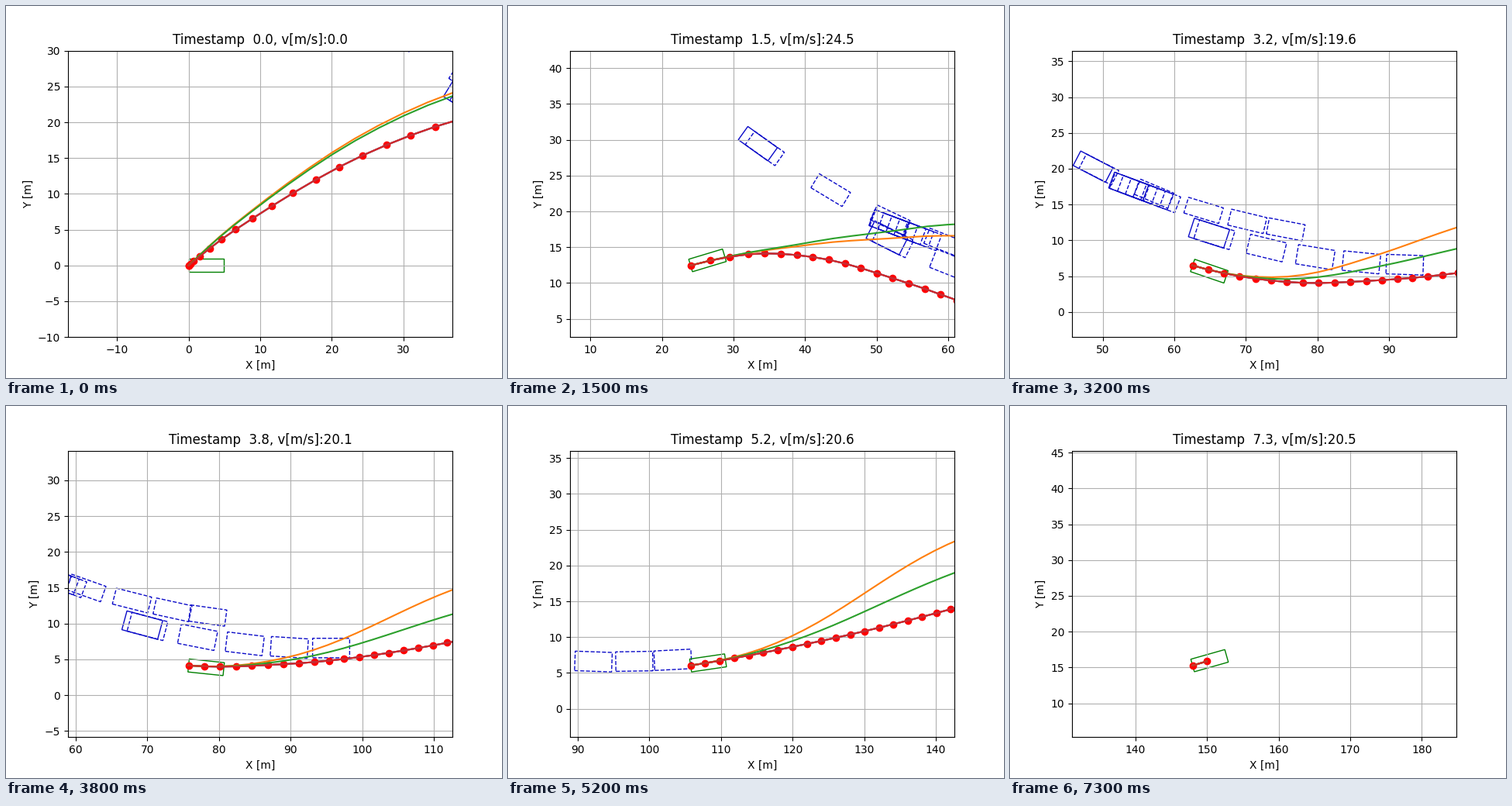
A matplotlib script that plays this animation: 640x480 px, repeating every 7400 ms.

```python
import numpy as np
import matplotlib.pyplot as plt
from matplotlib.animation import FuncAnimation
from matplotlib.patches import Rectangle

FRAMES = 74
DT = 0.1
HORIZON = 21
CAR_BLUE = "#0a0ac8"
LOOKAHEAD = (0.0, 0.1, 1.1, 2.1, 3.1, 4.1)


class Track:
    """Smooth route through a few (time, x, y) key points."""

    def __init__(self, *keys):
        keys = np.array(keys, float)
        self.t, self.p = keys[:, 0], keys[:, 1:]
        self.m = np.gradient(self.p, self.t, axis=0, edge_order=2)

    def __call__(self, t):
        t = np.atleast_1d(np.asarray(t, float))
        s = np.clip(t, self.t[0], self.t[-1])
        i = np.clip(np.searchsorted(self.t, s, side="right") - 1, 0, len(self.t) - 2)
        h = (self.t[i + 1] - self.t[i])[:, None]
        u = (s - self.t[i])[:, None] / h
        out = ((1 + 2 * u) * (1 - u) ** 2 * self.p[i]
               + u * (1 - u) ** 2 * h * self.m[i]
               + u * u * (3 - 2 * u) * self.p[i + 1]
               + u * u * (u - 1) * h * self.m[i + 1])
        # straight continuation past either end
        slope = np.where((t < self.t[0])[:, None], self.m[0], self.m[-1])
        return out + (t - s)[:, None] * slope

    def heading(self, t, lag):
        dx, dy = self(t)[0] - self(t - lag)[0]
        return np.degrees(np.arctan2(dy, dx))


ego = Track((0, 0, 0), (0.15, 0.1, 0.08), (0.3, 0.55, 0.45), (0.7, 5.09, 3.81),
            (1.3, 18.7, 10.8), (1.8, 32, 14), (2.2, 40.93, 13.55),
            (2.8, 53.9, 9.65), (3.2, 62.56, 6.49), (3.8, 75.75, 4.15),
            (4.4, 88.98, 4.3), (6.0, 121.99, 8.99), (7.4, 149.95, 15.85))

# other cars: route and (length, width)
CARS = (
    (Track((0, 17.8, 41.3), (2.2, 40, 25.1), (4.3, 57.2, 16.5),
           (6.3, 70.2, 12.65), (8.5, 81, 10.9)), (5.08, 2.28)),
    (Track((2.2, 52.5, 17.95), (4.7, 55.3, 16.9), (7.3, 58.1, 15.85)), (5.08, 2.36)),
    (Track((0, 38.5, 23.4), (2.2, 57.12, 13.74), (4.3, 72.86, 8.92),
           (6.4, 86.75, 6.87), (8.5, 99, 6.65), (10.1, 107.35, 7.17)), (5.17, 2.72)),
)


def speed(t):
    return np.interp(t, (0, 0.7, 1.3, 2.2, 3.2, 4.4, 6),
                     (0, 19.9, 26.5, 17.6, 19.6, 20.6, 20.5))


def ease(tau):
    u = np.clip(tau / 2.4, 0, 1)
    return u ** 3 * (10 - 15 * u + 6 * u * u)


def best_path(t, tau):
    """Coming route plus the planner's drift, which fades as the run settles."""
    key = (0, 0.7, 2.2, 3.2)
    drift = np.array([np.interp(t, key, (9.7, 2, 0.1, 0)),
                      np.interp(t, key, (7.9, 2.6, -1.3, 0.3))])
    return ego(t + tau) + ease(tau)[:, None] * drift


def side_path(path, tau, offset):
    d = np.gradient(path, axis=0)
    normal = np.column_stack((-d[:, 1], d[:, 0])) / np.hypot(*d.T)[:, None]
    return path + normal * (offset * ease(tau))[:, None]


def side_offsets(t):
    if t < 1.85:
        return 4.5 + 5 * t, 4 + 7 * t
    wide = 7.3 + 1.07 * (t - 3.2)
    return wide, 0.54 * wide


def box(x, y, deg, size, anchor, **style):
    a = np.radians(deg)
    fx, fy = -anchor * size[0], -size[1] / 2
    corner = (x + fx * np.cos(a) - fy * np.sin(a), y + fx * np.sin(a) + fy * np.cos(a))
    ax.add_patch(Rectangle(corner, *size, angle=deg, fill=False, lw=1, **style))


fig, ax = plt.subplots(figsize=(6.4, 4.8), dpi=100)


def draw(i):
    t = i * DT
    x, y = ego(t)[0]
    ax.clear()

    for route, size in CARS:
        for ahead in LOOKAHEAD:
            when = t + ahead
            box(*route(when)[0], route.heading(when, 0.5), size, 0.5,
                edgecolor=CAR_BLUE, ls="--" if ahead else "-")
    box(x, y, ego.heading(t, 0.15) if i else 0, (4.93, 1.82), 0, edgecolor="g")

    tau = DT * np.arange(min(HORIZON, FRAMES + 1 - i))
    best = best_path(t, tau)
    ax.plot(*best.T, "-or")
    paths = [best, best]
    if not 1.85 < t < 2.65:
        paths[1:] = [side_path(best, tau, d) for d in side_offsets(t)] + [best]
    for k, path in enumerate(paths):
        ax.plot(*path.T, color=f"C{k}")

    half = 20 * 496 / 369.6
    ax.set_xlim(x + 10 - half, x + 10 + half)
    ax.set_ylim(y - 10, y + 30)
    ax.set_xlabel("X [m]")
    ax.set_ylabel("Y [m]")
    ax.set_title(f"Timestamp  {t:.1f}, v[m/s]:{speed(t):.1f}")
    ax.grid(True)
    return []


anim = FuncAnimation(fig, draw, frames=FRAMES, init_func=lambda: draw(0),
                     interval=100, repeat=True, repeat_delay=0)
plt.show()
```
